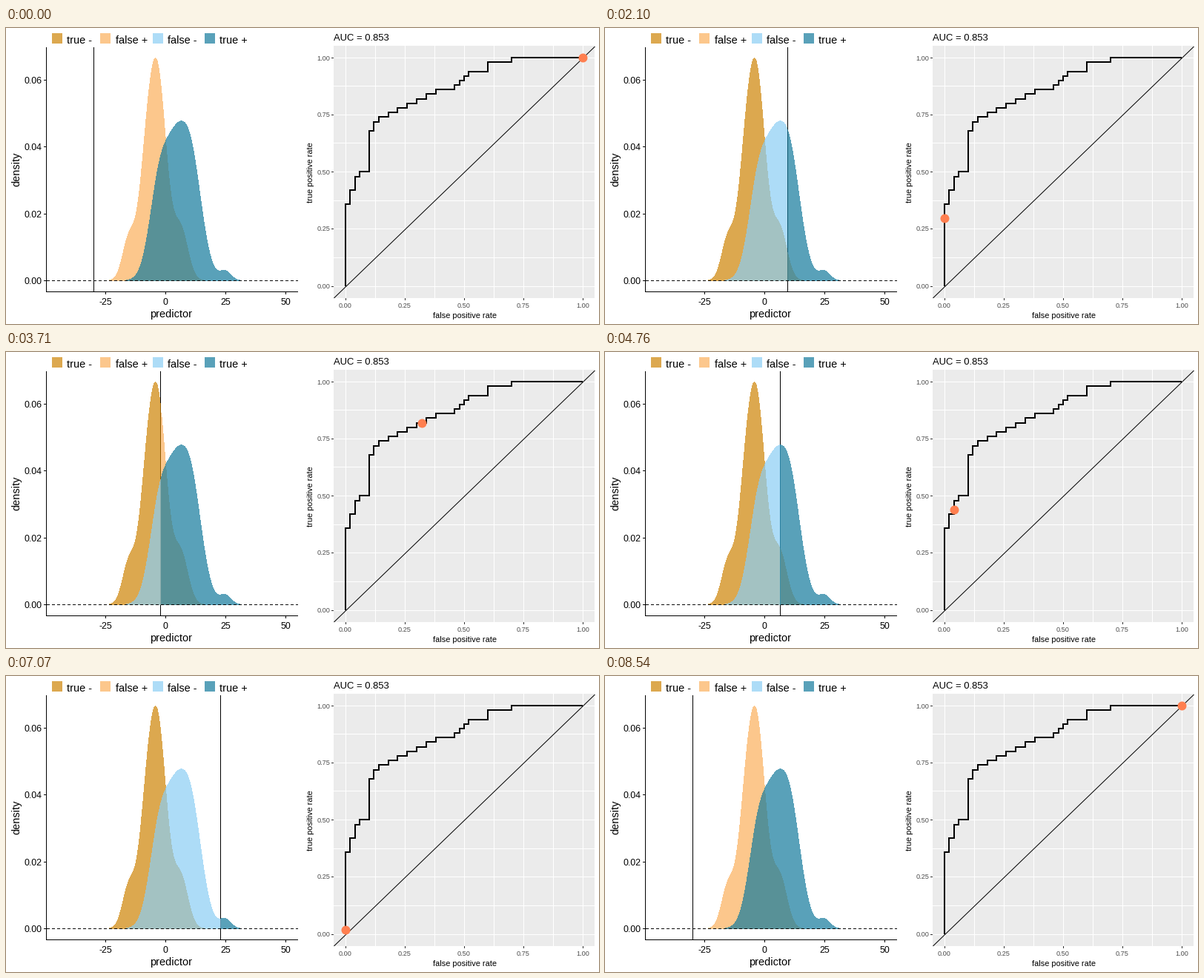
Animation, 800 px wide and 400 px high, one loop 9170 ms. Source, as a matplotlib script:

```python
import numpy as np
import matplotlib.pyplot as plt
from matplotlib.animation import FuncAnimation
from matplotlib.patches import Polygon, Rectangle

WIDTH, HEIGHT, DPI = 800, 400, 100
FRAMES, INTERVAL = 131, 70
PT = 72 / DPI
CASES = 50

TRUE_NEG, FALSE_POS, FALSE_NEG, TRUE_POS = "#CE8305", "#FCB05B", "#8BCEF4", "#137A9C"
ALPHA = 0.7

plt.rcParams["font.family"] = "Liberation Sans"
fig = plt.figure(figsize=(WIDTH / DPI, HEIGHT / DPI), dpi=DPI, facecolor="white")
ax = fig.add_axes([0, 0, 1, 1])
ax.set(xlim=(0, WIDTH), ylim=(HEIGHT, 0))
ax.axis("off")


def line(xs, ys, color="black", width=1, **kw):
    kw.setdefault("antialiased", False)
    return ax.plot(xs, ys, color=color, lw=width * PT, snap=False,
                   solid_capstyle="butt", **kw)[0]


def label(x, y, text, size, color="black", ha="center", va="baseline", **kw):
    ax.text(x, y, text, fontsize=size * PT, color=color, ha=ha, va=va, **kw)


def box(x, y, w, h, color, **kw):
    ax.add_patch(Rectangle((x, y), w, h, fc=color, lw=0, antialiased=False, **kw))


def pixel(position):
    """Centre of the pixel that holds a position."""
    return np.floor(position) + 0.5


# Density panel coordinates
def px(value):
    return 215.5 + 3.24 * value


def py(density):
    return 341.5 - 4525 * density


# ROC panel coordinates
def rx(rate):
    return 458 + 320 * rate


def ry(rate):
    return 349 - 309 * rate


grid = np.linspace(-50, 50, 512)


def bumps(*parts):
    """Sum of bell curves given as (centre, spread, height)."""
    return sum(h * np.exp(-0.5 * ((grid - m) / s) ** 2) for m, s, h in parts)


negatives = bumps((-15.2, 2.7, 0.0125), (-9, 2.8, 0.014), (-3.8, 3.94, 0.0635), (6.3, 3, 0.0145))
positives = bumps((-2, 4.3, 0.032), (3.8, 3.4, 0.0125), (9.5, 4.9, 0.041), (24.8, 2.4, 0.0027))


def share_above(density, threshold):
    total = np.cumsum(density)
    return 1 - np.interp(threshold, grid, total / total[-1])


# Threshold sweep: smooth curve through (frame, value) points
SWEEP = [(1, -30), (15, -5.3), (30.5, 9.6), (45, 3.9), (57.5, -3.2),
         (68, 6.5), (85, 35.8), (101, 22.8), (122, -30)]
times, stops = np.array(SWEEP).T
speeds = np.gradient(stops, times)


def threshold_at(frame):
    t = np.clip(frame, times[0], times[-1])
    i = min(np.searchsorted(times, t, side="right"), len(times) - 1) - 1
    span = times[i + 1] - times[i]
    u = (t - times[i]) / span
    ease = u * u * (3 - 2 * u)
    pull = speeds[i] * u * (1 - u) ** 2 - speeds[i + 1] * u * u * (1 - u)
    return stops[i] + (stops[i + 1] - stops[i]) * ease + span * pull


def staircase(keys):
    """Join (false, true) positive counts by even steps: across, then up."""
    points = [keys[0]]
    for (x0, y0), (x1, y1) in zip(keys, keys[1:]):
        n = max(1, min(x1 - x0, y1 - y0))
        for u in np.arange(1, n + 1) / n:
            x, y = round(x0 + (x1 - x0) * u), round(y0 + (y1 - y0) * u)
            points += [(x, points[-1][1]), (x, y)]
    return np.array(points)


corners = staircase([(0, 0), (0, 18), (2, 24), (3, 25), (5, 25), (5, 34), (7, 37), (19, 43),
                     (23, 44), (26, 47), (30, 47), (30, 49), (35, 50), (50, 50)])


def rates(threshold):
    """Walk the staircase by as many cases as lie above the threshold."""
    above = share_above(negatives, threshold) + share_above(positives, threshold)
    count = np.round(CASES * above)
    walked = corners.sum(axis=1)
    return [np.interp(count, walked, side) / CASES for side in corners.T]


def draw_density_panel():
    legend = [(62, "true -", TRUE_NEG), (127, "false +", FALSE_POS),
              (198, "false -", FALSE_NEG), (268, "true +", TRUE_POS)]
    for x, text, color in legend:
        box(x, 7, 14, 14, color, alpha=ALPHA)
        label(x + 20.5, 21, text, 14.5, ha="left")
    line([54.5, 54.5], [26, 357])
    line([54, 394], [356.5, 356.5])
    for value in (0, 0.02, 0.04, 0.06):
        y = pixel(py(value))
        line([51, 54], [y, y])
        label(48.5, y + 4.5, f"{value:.2f}", 12.4, ha="right")
    for value in (-25, 0, 25, 50):
        x = pixel(px(value))
        line([x, x], [357, 360])
        label(x - 0.5, 374, str(value), 12.4)
    label(223, 391, "predictor", 14.5)
    label(14.5, 191, "density", 14.5, va="center", rotation=90)
    line([55, 394], [341.5, 341.5], linestyle=(0, (4, 4)), dash_capstyle="butt", zorder=6)


def draw_roc_panel():
    left, right, top, bottom = 442, 794, 24, 365
    box(left, top, right - left, bottom - top, "#EBEBEB", zorder=0)
    for rate in np.arange(0, 1.01, 0.125):
        x, y = pixel(rx(rate)), pixel(ry(rate))
        line([x, x], [top, bottom], "white", zorder=1)
        line([left, right], [y, y], "white", zorder=1)
        if rate % 0.25 == 0:
            line([x, x], [bottom, bottom + 3], "#333333")
            line([left - 3, left], [y, y], "#333333")
            label(x - 0.5, 377.5, f"{rate:.2f}", 9.2, "#4D4D4D")
            label(437, y + 3, f"{rate:.2f}", 9.2, "#4D4D4D", ha="right")
    ends = np.array([-0.05, 1.05])
    line(rx(ends) + 0.5, ry(ends) + 0.5, antialiased=True, zorder=3)
    line(np.round(rx(corners[:, 0] / CASES)), np.round(ry(corners[:, 1] / CASES)),
         width=2, zorder=4, solid_joinstyle="miter")
    label(442, 17, "AUC = 0.853", 13, ha="left")
    label(618.5, 392, "false positive rate", 11)
    label(411.5, 195, "true positive rate", 11, va="center", rotation=90)


def area(color, zorder):
    return ax.add_patch(Polygon([(0, 0)], closed=True, fc=color, lw=0, alpha=ALPHA,
                                antialiased=False, zorder=zorder))


draw_density_panel()
draw_roc_panel()
cut_line = line([0, 0], [26, 356], zorder=3)
areas = [(negatives, area(TRUE_NEG, 4), area(FALSE_POS, 4)),
         (positives, area(FALSE_NEG, 5), area(TRUE_POS, 5))]
dot, = ax.plot([], [], "o", color="#FF7F50", ms=12 * PT, mew=0, snap=False, zorder=7)


def fill(patch, density, keep):
    keep = keep & (density > 1e-4)
    patch.set_visible(keep.sum() > 1)
    if patch.get_visible():
        x, y = px(grid[keep]), py(density[keep])
        patch.set_xy(np.column_stack([np.r_[x[0], x, x[-1]],
                                      np.r_[py(0), y, py(0)]]))


def update(frame):
    threshold = threshold_at(frame)
    x = pixel(px(threshold))
    cut_line.set_xdata([x, x])
    for density, below, above in areas:
        fill(below, density, grid < threshold)
        fill(above, density, grid >= threshold)
    fpr, tpr = rates(threshold)
    dot.set_data([rx(fpr) + 0.3], [ry(tpr) + 0.3])
    return []


anim = FuncAnimation(fig, update, frames=FRAMES, interval=INTERVAL,
                     repeat=True, repeat_delay=0, blit=False)
plt.show()
```
